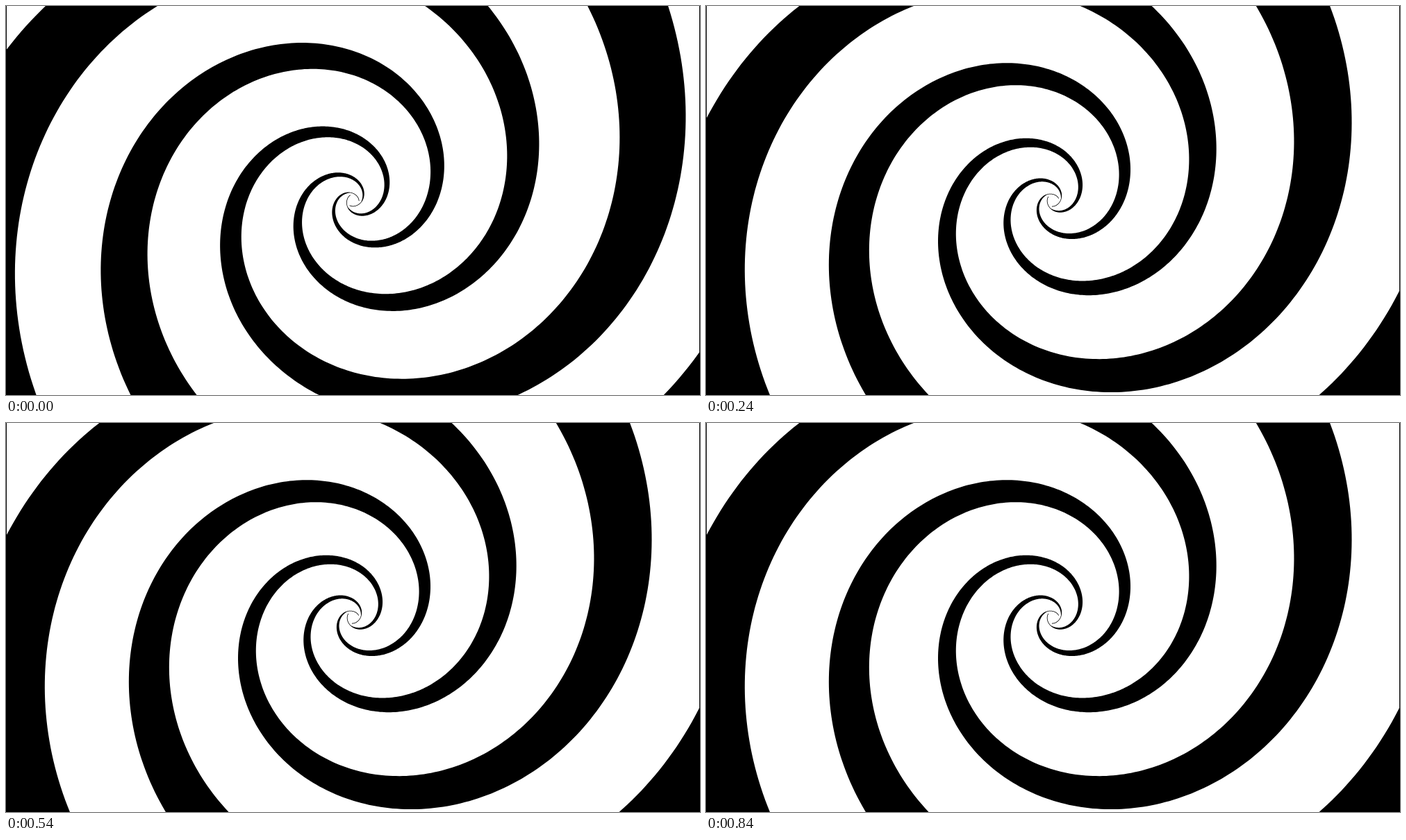
Animation of 999 by 561 pixels, one loop 0.87 s. Source, as an HTML page with a canvas:

```html
<!DOCTYPE html>
<html>
<head>
<meta charset="utf-8">
<style>
  html, body { margin: 0; width: 100%; height: 100%; overflow: hidden; background: #fff; }
  canvas { display: block; }
</style>
</head>
<body>
<canvas width="999" height="561"></canvas>
<script>
  const ctx = document.querySelector('canvas').getContext('2d');
  const W = 999, H = 561, ARMS = 3;
  const STEP_MS = 30, STEPS = 29, TURN = Math.PI / 15;
  const START = 1, END = 15, PHASE = 10.498 + Math.PI;

  // Radii of an arm's two edges; the exponentials round off the hub
  const outer = u => 2.7 + 0.2996 * u ** 3 + 7 * Math.exp(-((u / 2.6) ** 2));
  const inner = u => Math.min(
    outer(u) - 0.8,
    2.3 + 0.785 * Math.max(0, u - 0.865) ** 2.6 + 80 * Math.exp(-u));

  const arm = new Path2D();
  const addPoint = (u, r) => arm.lineTo(r * Math.cos(u), -r * Math.sin(u));
  for (let u = START; u <= END; u += 0.02) addPoint(u, outer(u));
  for (let u = END; u >= START; u -= 0.02) addPoint(u, inner(u));
  arm.closePath();

  function draw(now) {
    const step = Math.floor(now / STEP_MS) % STEPS;
    ctx.fillStyle = '#fff';
    ctx.fillRect(0, 0, W, H);
    ctx.fillStyle = '#000';
    ctx.save();
    ctx.translate(W / 2, H / 2);
    ctx.rotate(PHASE + step * TURN);
    for (let i = 0; i < ARMS; i++) {
      ctx.fill(arm);
      ctx.rotate(2 * Math.PI / ARMS);
    }
    ctx.restore();
    ctx.fillRect(0, 0, 1, H);
    ctx.fillRect(W - 1, 0, 1, H);
  }

  function loop() {
    draw(performance.now());
    requestAnimationFrame(loop);
  }
  loop();
</script>
</body>
</html>
```
